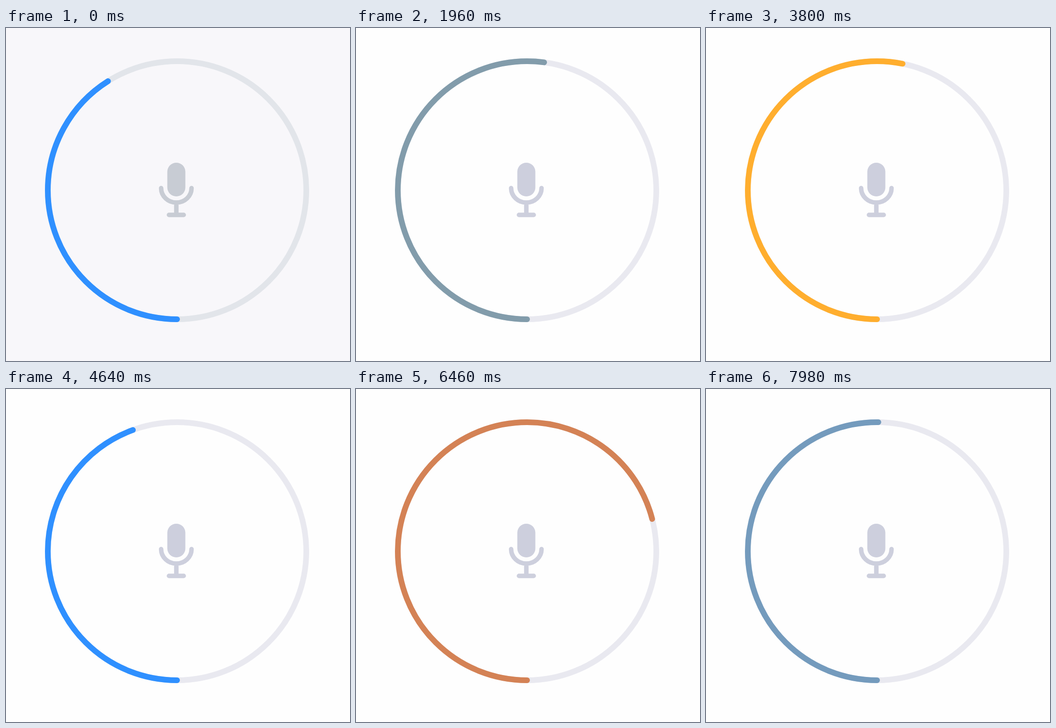
Write an HTML page that moves like this. It is 724x702 px and loops after 8 s.

```html
<!DOCTYPE html>
<html lang="en">
<head>
<meta charset="utf-8">
<title>Microphone level</title>
<style>
  html, body { margin: 0; width: 100%; height: 100%; overflow: hidden; }
  body { --ring: #e9e9f0; --mic: #cdcfdd; background: #fefefe; }
  body.dim { --ring: #e2e5ea; --mic: #c8ccd4; background: #f8f7fa; }
  svg { display: block; width: 724px; height: 702px; }
  .ring, .level { fill: none; stroke-width: 12; }
  .ring { stroke: var(--ring); }
  .level { stroke-linecap: round; }
  .mic { fill: none; stroke: var(--mic); stroke-width: 9.5; stroke-linecap: round; }
  .mic rect { fill: var(--mic); stroke: none; }
</style>
</head>
<body class="dim">
<svg viewBox="0 0 724 702">
  <circle class="ring" cx="360" cy="342" r="272"/>
  <circle class="level" cx="360" cy="342" r="272" pathLength="360"
          transform="rotate(90 360 342)" stroke="#2f90ff" stroke-dasharray="147.7 360"/>
  <g class="mic">
    <rect x="339.5" y="284" width="38" height="71" rx="19"/>
    <path d="M326.5 337.5A32 30.5 0 0 0 390.5 337.5M358.5 368V394M343 394H374"/>
  </g>
</svg>
<script>
  const LOOP = 8000;
  const BLUE = [47, 144, 255], AMBER = [255, 174, 46];
  const ORANGE = [255, 153, 51], DEEP = [255, 126, 42];

  // [step, arc sweep in degrees]
  const levels = [
    [0, 147.7], [29, 142.9], [34, 143], [52, 250], [57, 250], [82, 191.4],
    [100, 160], [125, 150], [139, 255.5], [153, 232], [171, 180.6]
  ];
  // [step, arc colour]
  const colors = [
    [0, BLUE], [40, BLUE], [45, AMBER], [52, ORANGE], [60, ORANGE], [68, AMBER],
    [89, AMBER], [97, BLUE], [131, BLUE], [139, [212, 130, 85]], [142, DEEP],
    [154, AMBER], [164, AMBER], [171, [116, 155, 189]]
  ];

  const linear = x => x;
  const smooth = x => x * x * (3 - 2 * x);
  const mix = (a, b, x) => a + (b - a) * x;

  function sample(keys, step, ease, blend) {
    const next = Math.max(1, keys.findIndex(key => key[0] >= step));
    const [from, a] = keys[next - 1];
    const [to, b] = keys[next];
    return blend(a, b, ease((step - from) / (to - from)));
  }

  // Steps last 20, 20 and 100 ms in turn.
  function stepAt(time) {
    const shifted = time + 20;
    const phase = shifted % 140;
    return Math.floor(shifted / 140) * 3 + (phase < 20 ? 0 : phase < 40 ? 1 : 2) - 1;
  }

  const arc = document.querySelector('.level');
  const start = performance.now();

  function draw(now) {
    const time = Math.max(0, now - start) % LOOP;
    const step = stepAt(time);
    const sweep = sample(levels, step, smooth, mix);
    const rgb = sample(colors, step, linear,
      (a, b, x) => a.map((channel, i) => Math.round(mix(channel, b[i], x))));
    document.body.classList.toggle('dim', step === 0);
    arc.setAttribute('stroke-dasharray', `${sweep} 360`);
    arc.setAttribute('stroke', `rgb(${rgb})`);
    requestAnimationFrame(draw);
  }
  requestAnimationFrame(draw);
</script>
</body>
</html>
```
